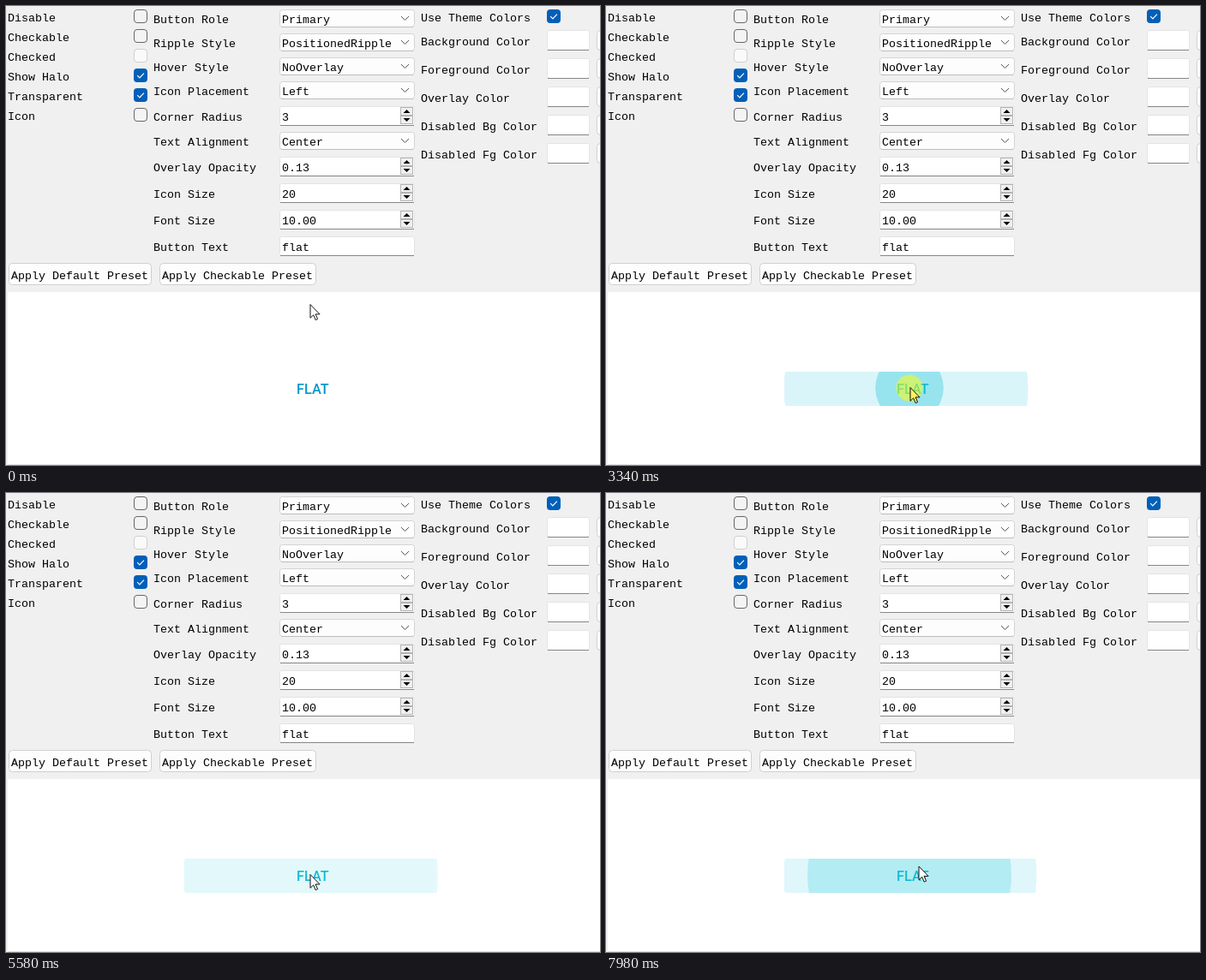
These frames come from a looping animation (693x536 px, 8000 ms). An HTML page:

```html
<!DOCTYPE html>
<html lang="en">
<head>
<meta charset="utf-8">
<title>Flat button settings</title>
<style>
  html, body { margin: 0; width: 100%; height: 100%; overflow: hidden; background: #f0f0f0; }
  svg { display: block; width: 693px; height: 536px; }
  text { font: 13.333px "Liberation Mono", monospace; fill: #000; white-space: pre; }
  #caption { font: 500 16.3px Roboto, sans-serif; }
</style>
</head>
<body>
<svg id="stage" viewBox="0 0 693 536">
  <defs><clipPath id="buttonShape"><rect x="208" y="427" width="296" height="40" rx="3"/></clipPath></defs>
  <g id="form"></g>
  <rect x="2" y="334" width="691" height="201" fill="#fff"/>
  <path d="M2 535.5H693" stroke="#e0e0e0"/>
  <g id="ripples" clip-path="url(#buttonShape)"></g>
  <text id="caption" x="339" y="453">FLAT</text>
  <circle id="press" r="15.5" fill="#ff0" fill-opacity=".5"/>
  <path id="cursor" d="M.5 .5V16.3L4.2 12.8L6.7 18.6L9.1 17.6L6.6 11.9H11.6Z" stroke="#111" stroke-width="1"/>
</svg>
<script>
const byId = id => document.getElementById(id);
const form = byId('form');

function add(parent, tag, attrs, content) {
  const node = document.createElementNS('http://www.w3.org/2000/svg', tag);
  for (const key in attrs) node.setAttribute(key, attrs[key]);
  if (content) node.textContent = content;
  parent.append(node);
  return node;
}
const box = (x, y, width, height, rx, fill, stroke) =>
  add(form, 'rect', { x, y, width, height, rx, fill, stroke });
const line = (d, stroke, width = 1) =>
  add(form, 'path', { d, stroke, 'stroke-width': width, fill: 'none' });
const label = (x, middle, content) => add(form, 'text', { x, y: middle + 4.5 }, content);

function checkBox(x, y, state) {
  if (state === 'on') {
    box(x - 8, y - 8, 16, 16, 4, '#005fb8', 'none');
    line(`M${x - 3.8} ${y + .2}l2.7 2.7l5-5.2`, '#fff', 1.2);
  } else {
    box(x - 7.5, y - 7.5, 15, 15, 3.5, state === 'off' ? '#f4f4f4' : '#fafafa',
        state === 'off' ? '#666' : '#cfcfcf');
  }
}

function field(x, top, width, height) {
  box(x + .5, top + .5, width - 1, height - 1, 2, '#fff', '#e3e3e3');
  line(`M${x + 1} ${top + height - .5}h${width - 2}`, '#868686');
}

function combo(top, value) {
  box(319.5, top + .5, 157, 20, 3, '#fdfdfd', '#d4d4d4');
  line(`M321 ${top + 20.5}h154`, '#bdbdbd');
  line(`M461 ${top + 8}l4.5 4.5l4.5-4.5`, '#555');
  label(322, top + 11, value);
}

function spinBox(top, value) {
  field(319, top, 158, 23);
  for (const [y, tip] of [[top + 1.5, -1], [top + 11.5, 1]]) {
    box(460.5, y, 14, 9, 0, '#f0f0f0', '#b4b4b4');
    const base = y + 4.5 - tip * 2;
    add(form, 'path', { d: `M463.5 ${base}h8l-4 ${tip * 4}z`, fill: '#000' });
  }
  label(322, top + 12, value);
}

function pushButton(x, width, content) {
  box(x + .5, 300.5, width - 1, 25, 4, '#fdfdfd', '#d0d0d0');
  label(x + 3, 314, content);
}

const flags = [['Disable', 'off'], ['Checkable', 'off'], ['Checked', 'disabled'],
               ['Show Halo', 'on'], ['Transparent', 'on'], ['Icon', 'off']];
flags.forEach(([name, state], i) => {
  label(2, 13 + 23 * i, name);
  checkBox(157, 12 + 23 * i, state);
});

const settings = [
  ['Button Role', 15, combo, 4, 'Primary'],
  ['Ripple Style', 43, combo, 32, 'PositionedRipple'],
  ['Hover Style', 71, combo, 60, 'NoOverlay'],
  ['Icon Placement', 99, combo, 88, 'Left'],
  ['Corner Radius', 129, spinBox, 117, '3'],
  ['Text Alignment', 158, combo, 147, 'Center'],
  ['Overlay Opacity', 188, spinBox, 176, '0.13'],
  ['Icon Size', 219, spinBox, 207, '20'],
  ['Font Size', 250, spinBox, 238, '10.00']
];
for (const [name, y, draw, top, value] of settings) {
  label(172, y, name);
  draw(top, value);
}
label(172, 281, 'Button Text');
field(319, 269, 158, 23);
label(322, 281, 'flat');

label(484, 13, 'Use Theme Colors');
checkBox(639, 12, 'on');
['Background', 'Foreground', 'Overlay', 'Disabled Bg', 'Disabled Fg'].forEach((name, i) => {
  const y = 41 + 33 * i;
  label(484, y, name + ' Color');
  field(631, y - 13, 50, 24);
  box(689.5, y - 12.5, 20, 23, 4, '#fdfdfd', '#d0d0d0');
});

pushButton(3, 167, 'Apply Default Preset');
pushButton(179, 183, 'Apply Checkable Preset');

// The motion is a slowed recording: each run has a start, an end and a count of steps.
const LOOP = 8000, STEP_MS = 17.5;
const runs = [[20, 750, 11], [850, 1620, 12], [1720, 2520, 11], [2620, 3380, 12],
              [3480, 4190, 11], [4290, 5050, 12], [5150, 5870, 11], [5970, 6760, 11],
              [6790, 7510, 11], [7610, 7980, 6]];

function stepAt(time) {
  let step = 0;
  for (const [start, end, count] of runs) {
    if (time < start) break;
    const part = Math.min(1, (time - start) / (end - start));
    step += 1 + Math.floor(part * (count - 1) + 1e-6);
    if (time < end) break;
  }
  return step;
}

// Step at which each click happens, and where.
const clicks = [[18.4, 350, 447], [40.1, 354, 446], [77.3, 354, 446], [89.3, 354, 446]];
const ripples = clicks.map(([, cx, cy]) =>
  add(byId('ripples'), 'circle', { cx, cy, fill: '#00bcd4' }));

const cursorPath = [[0, 354.5, 348], [4, 351, 350], [8, 342, 359], [11, 336.5, 372],
                    [14, 339, 404], [16, 346, 433], [18, 350, 447], [28, 350, 447],
                    [34, 354.5, 445], [98, 354.5, 445], [108, 364.5, 435.5]];

function cursorAt(step) {
  const i = Math.max(1, cursorPath.findIndex(p => p[0] >= step));
  const [s0, x0, y0] = cursorPath[i - 1], [s1, x1, y1] = cursorPath[i];
  const part = (step - s0) / (s1 - s0);
  return [x0 + (x1 - x0) * part, y0 + (y1 - y0) * part];
}

const left = (age, duration) => Math.max(0, 1 - age / duration) ** 2;

function render(time) {
  const step = stepAt(time);
  let pressed = null;
  clicks.forEach((click, i) => {
    const age = (step - click[0]) * STEP_MS;
    const live = age >= 0;
    ripples[i].setAttribute('r', live ? 150 * (1 - left(age, 600)) : 0);
    ripples[i].setAttribute('fill-opacity', live ? .35 * left(age, 1300) : 0);
    if (live && age < 130) pressed = click;
  });

  const press = byId('press');
  press.setAttribute('visibility', pressed ? 'visible' : 'hidden');
  if (pressed) {
    press.setAttribute('cx', pressed[1]);
    press.setAttribute('cy', pressed[2]);
  }
  byId('caption').style.fill = step < clicks[0][0] ? '#0097c7' : '#12bbd4';
  const cursor = byId('cursor');
  cursor.setAttribute('transform', `translate(${cursorAt(step)})`);
  cursor.setAttribute('fill', pressed ? '#fff060' : '#fff');
}

const began = performance.now();
function tick() {
  render((performance.now() - began) % LOOP);
  requestAnimationFrame(tick);
}
tick();
</script>
</body>
</html>
```
